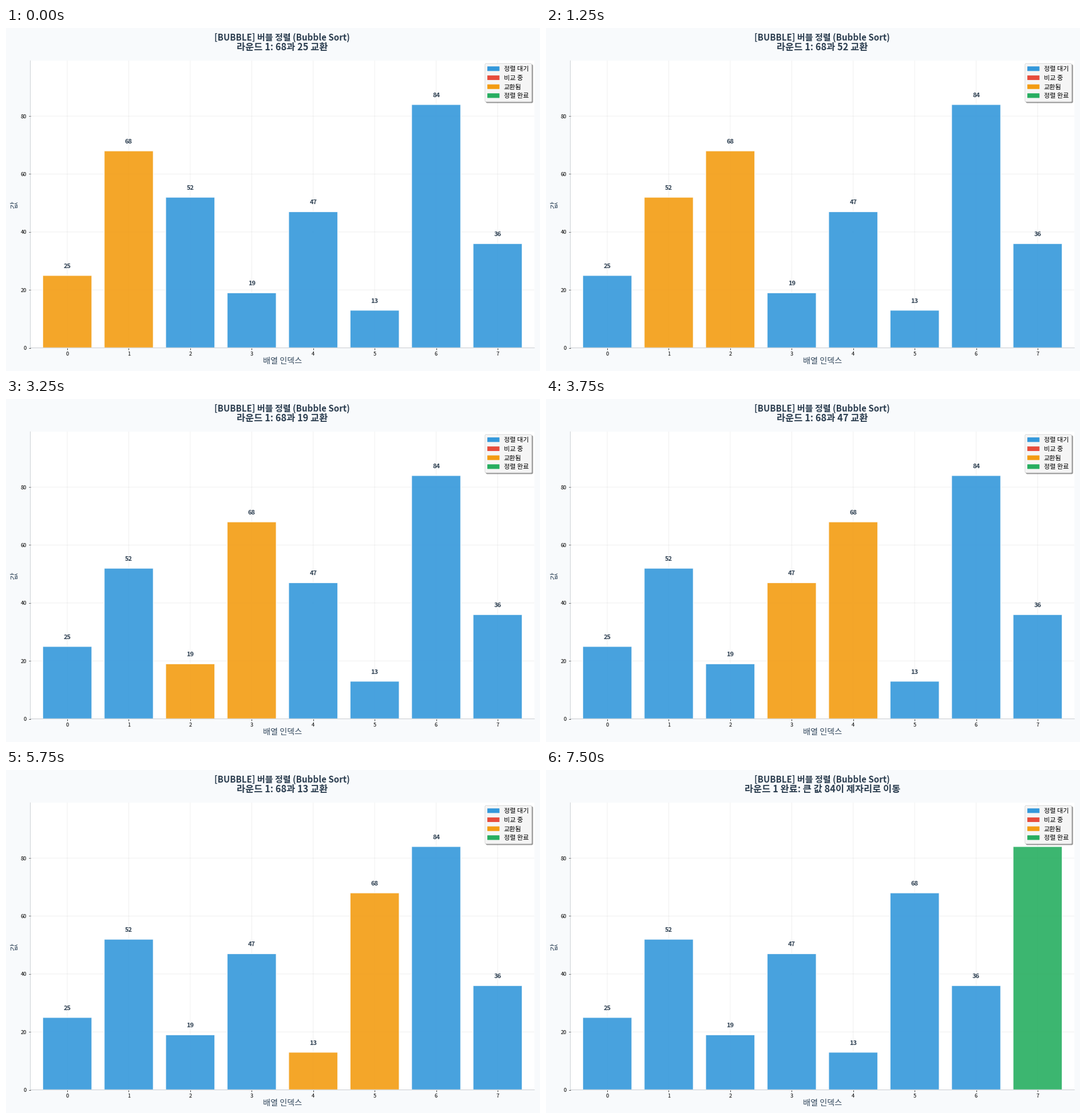
Recreate the animation shown at these times as a matplotlib script. Size 933 by 600 pixels, loop 8000 ms.

```python
import matplotlib.pyplot as plt
from matplotlib.animation import FuncAnimation
from matplotlib.patches import FancyBboxPatch, Rectangle

W, H, DPI = 933, 600, 64
PT = 72 / DPI  # points per pixel

WAIT, COMPARE, SWAP, DONE = "#3498db", "#e74c3c", "#f39c12", "#27ae60"
INK, SOFT = "#2c3e50", "#34495e"
VALUES = [68, 25, 52, 19, 47, 13, 84, 36]
INTERVAL, FRAMES, HOLD = 250, 32, 5

plt.rcParams["font.family"] = "Noto Sans CJK JP"
plt.rcParams["path.snap"] = False  # keep sub-pixel edges


def first_round(values):
    """Return (caption, values, colours) for each swap of one bubble pass."""
    row, steps = list(values), []
    for i in range(len(row) - 1):
        if row[i] > row[i + 1]:
            big, small = row[i], row[i + 1]
            row[i], row[i + 1] = small, big
            colors = [SWAP if k in (i, i + 1) else WAIT for k in range(len(row))]
            steps.append((f"라운드 1: {big}과 {small} 교환", list(row), colors))
    colors = [WAIT] * (len(row) - 1) + [DONE]
    steps.append((f"라운드 1 완료: 큰 값 {row[-1]}이 제자리로 이동", list(row), colors))
    return steps


STEPS = first_round(VALUES)

fig = plt.figure(figsize=(W / DPI, H / DPI), dpi=DPI, facecolor="#f8fafc")

# Chart
left, right, top, bottom = 42.6, 923.4, 57.2, 559.5
ax = fig.add_axes([left / W, 1 - bottom / H, (right - left) / W, (bottom - top) / H])
ax.set_xlim(-0.6, 7.6)
ax.set_ylim(0, max(VALUES) * 1.18)
ax.set_xticks(range(len(VALUES)))
ax.set_yticks(range(0, 81, 20))
ax.set_axisbelow(True)
ax.grid(color="#b0b0b0", alpha=0.25, linewidth=0.74 * PT)
ax.tick_params(labelsize=9.3 * PT, length=3.24 * PT, width=0.74 * PT, pad=3.24 * PT)
ax.spines[["top", "right"]].set_visible(False)
for side in ("left", "bottom"):
    ax.spines[side].set_color("#bdc3c7")
    ax.spines[side].set_linewidth(0.74 * PT)

bars = ax.bar(range(len(VALUES)), VALUES, width=0.8, alpha=0.9,
              edgecolor="white", linewidth=1.5 * PT)
labels = [ax.text(k, 0, "", ha="center", va="baseline", color=INK,
                  size=11 * PT, weight="bold") for k in range(len(VALUES))]

# Pixel-space layer for titles and legend
layer = fig.add_axes([0, 0, 1, 1], zorder=5)
layer.set_xlim(0, W)
layer.set_ylim(H, 0)
layer.axis("off")


def write(x, y, text, size, color=INK, **style):
    style = {"ha": "center", "va": "baseline", **style}
    return layer.text(x, y, text, size=size * PT, color=color, **style)


def rounded_box(x, y, **style):
    layer.add_patch(FancyBboxPatch((x, y), 81.4, 66.8, linewidth=0.93 * PT,
                                   boxstyle="round,pad=0,rounding_size=2", **style))


write(482.7, 22, "[BUBBLE] 버블 정렬 (Bubble Sort)", 15.1, weight="bold")
caption = write(483, 38.7, "", 16.4, weight="bold")
write(483, 587, "배열 인덱스", 14.2, SOFT)
write(15, 309, "값", 14.2, SOFT, rotation=90, va="center")

rounded_box(838.9, 64.1, color="0.3", alpha=0.5)
rounded_box(837, 62.3, facecolor="white", edgecolor="0.8", alpha=0.9)
legend = [(WAIT, "정렬 대기"), (COMPARE, "비교 중"), (SWAP, "교환됨"), (DONE, "정렬 완료")]
for n, (color, name) in enumerate(legend):
    y = 71.2 + 15.7 * n
    layer.add_patch(Rectangle((841.4, y - 3.5), 20.4, 7.1, color=color,
                              linewidth=0.93 * PT))
    write(869.6, y + 3.9, name, 11.2, "black", ha="left")


def draw(frame):
    text, row, colors = STEPS[min(frame // HOLD, len(STEPS) - 1)]
    caption.set_text(text)
    for bar, label, value, color in zip(bars, labels, row, colors):
        bar.set_height(value)
        bar.set_facecolor(color)
        label.set_text(str(value))
        label.set_y(value + 2.57)
    return [caption, *bars, *labels]


anim = FuncAnimation(fig, draw, frames=FRAMES, interval=INTERVAL,
                     init_func=lambda: draw(0), repeat=True, repeat_delay=0)
plt.show()
```
